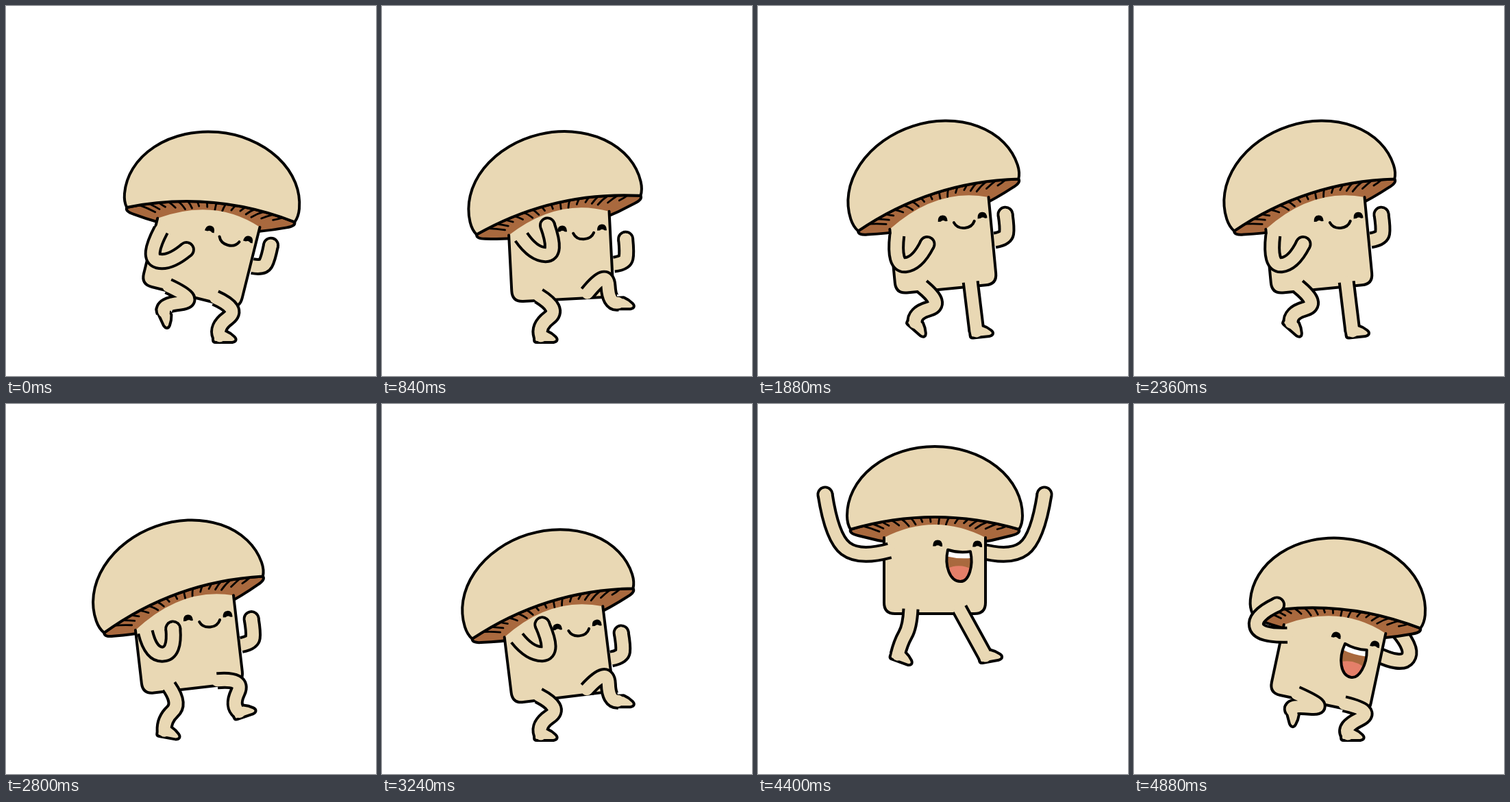
Animation, 540 px wide and 540 px high, one loop 4.92 s. Source, as an HTML page with a canvas:

```html
<!DOCTYPE html>
<html lang="en">
<head>
<meta charset="utf-8">
<title>Dancing mushroom</title>
<style>
  html, body { margin: 0; width: 100%; height: 100%; overflow: hidden; background: #fff; }
  canvas { display: block; width: 100vmin; height: 100vmin; }
</style>
</head>
<body>
<canvas width="540" height="540"></canvas>
<script>
const ctx = document.querySelector('canvas').getContext('2d');
const LOOP = 4920, STEP = 40, BEAT = 480;
const INK = '#000', SKIN = '#e9d8b4', GILL = '#a9693e', TONGUE = '#e57f69';
const LEFT_FOOT = 232, RIGHT_FOOT = 312, GROUND = 482, LEG_LENGTH = 70;
const { sin, cos, PI } = Math;
const clamp = v => Math.min(1, Math.max(0, v));
const rad = deg => deg * PI / 180;
const mix = (a, b, k) => a.map((v, i) => v + (b[i] - v) * k);
const mirror = points => points.map((v, i) => i % 2 ? v : -v);

// Arms in body space: shoulder, two bends, hand
const ARM_LOW = [-65, -84, -76, -39, -41, -39, -22, -65];
const ARM_HIGH = [-56, -94, -40, -68, -4, -65, -17, -109];
const ARM_HANGING = [77, -65, 93, -66, 97, -81, 96, -101];
const ARM_UP = [-66, -92, -110, -80, -150, -110, -160, -174];
const ARM_BEHIND = [-66, -88, -107, -78, -119, -106, -90, -128];

const leftArm = lift => mix(ARM_LOW, ARM_HIGH, lift);
const rightArm = drop => ARM_HANGING.map((v, i) => i % 2 ? v + 18 * drop : v);

// Ankle x, y and foot angle: on the ground, then one swing per beat
function step(x, time) {
  const w = clamp((time % BEAT - 140) / 310) ** 1.3;
  const arc = sin(PI * w), wave = sin(2 * PI * w);
  return [x + 22 * arc - 16 * wave, GROUND - 54 * arc, 36 * arc + 42 * wave];
}

// Torso: hip x, hip y, body angle, cap angle
function dance(t) {
  const a = 2 * PI * t / BEAT;
  const lean = 18 * clamp(1 - t / 1600) ** 2 + 16 * clamp((t - 3300) / 380);
  const bob = ((1 - cos(2 * a)) / 2) ** 2;
  return {
    torso: [
      267 + 2 * cos(a) + 3 * sin(a) - 9 * sin(2 * a),
      426 - 2 * cos(2 * a) + 14 * sin(2 * a),
      lean - 4 + 3 * sin(a),
      lean - 5.4 - 7.6 * cos(a) + 12 * sin(a)
    ],
    leftArm: leftArm(bob),
    rightArm: rightArm(bob),
    leftFoot: step(LEFT_FOOT, t + BEAT / 2),
    rightFoot: step(RIGHT_FOOT, t)
  };
}

const CROUCH = {
  torso: [262, 440, 12, 19],
  leftArm: leftArm(0.75), rightArm: rightArm(0),
  leftFoot: step(LEFT_FOOT, 0), rightFoot: step(RIGHT_FOOT, 0)
};
const JUMP = {
  torso: [258, 404, 0, 0],
  leftArm: ARM_UP, rightArm: mirror(ARM_UP),
  leftFoot: [204, 464, 20], rightFoot: [332, 466, -10]
};
const LAND = {
  torso: [270, 437, 12, 5],
  leftArm: ARM_BEHIND, rightArm: mirror(ARM_BEHIND),
  leftFoot: [231, 447, 75], rightFoot: step(RIGHT_FOOT, 0)
};

function blend(from, to, k) {
  const pose = {};
  for (const part in from) pose[part] = mix(from[part], to[part], k);
  return pose;
}

function poseAt(t) {
  if (t < 3880) return blend(dance(t), CROUCH, clamp((t - 3800) / 80));
  if (t < 3960) return blend(CROUCH, JUMP, (t - 3880) / 80);
  return blend(JUMP, LAND, clamp((t - 4780) / 100));
}

function within(x, y, angle, draw) {
  ctx.save();
  ctx.translate(x, y);
  ctx.rotate(rad(angle));
  draw();
  ctx.restore();
}

function shape(path, fill, line) {
  const p = new Path2D(path);
  if (fill) { ctx.fillStyle = fill; ctx.fill(p); }
  if (line) { ctx.lineWidth = line; ctx.strokeStyle = INK; ctx.stroke(p); }
}

// Tube that is open at the near end; drawEnd adds the hand or foot
function limb([ax, ay, bx, by, cx, cy, dx, dy], drawEnd) {
  const bend = new Path2D(
    `M${ax} ${ay}Q${bx} ${by} ${(bx + cx) / 2} ${(by + cy) / 2}Q${cx} ${cy} ${dx} ${dy}`);
  for (const [color, width, cap] of [[INK, 25, 'butt'], [SKIN, 17, 'round']]) {
    ctx.strokeStyle = color;
    ctx.lineWidth = width;
    ctx.lineCap = cap;
    ctx.stroke(bend);
    within(dx, dy, 0, () => drawEnd(color, width));
  }
}

function arm(points) {
  limb(points, (color, width) => {
    ctx.fillStyle = color;
    ctx.beginPath();
    ctx.arc(0, 0, width / 2, 0, 7);
    ctx.fill();
  });
}

// The knee bends forward as far as the leg is shortened
function leg([x, y, bodyAngle], side, [footX, footY, footAngle]) {
  const c = cos(rad(bodyAngle)), s = sin(rad(bodyAngle));
  const hipX = x + side * c + 7 * s, hipY = y + side * s - 7 * c;
  const dx = footX - hipX, dy = footY - hipY, reach = Math.hypot(dx, dy);
  const bend = Math.sqrt(Math.max(0, LEG_LENGTH ** 2 - reach ** 2)) / 2 / reach;
  const joint = (along, out) =>
    [hipX + dx * along + dy * bend * out, hipY + dy * along - dx * bend * out];
  limb([hipX, hipY, ...joint(0.36, 1.65), ...joint(0.75, -0.2), footX, footY], color =>
    within(0, 0, footAngle, () =>
      shape('M-8-5V5Q-8 7-6 7H18Q24 6 20 2Q15-3 8-6Z', color, color === INK && 8)));
}

function cap() {
  shape('M-123 0Q0-36 123 0Q125 6 112 9Q0 40-112 9Q-125 6-123 0Z', GILL, 4);
  ctx.lineCap = 'round';
  for (let x = -105; x <= 105; x += 14) {
    const y = -18 * (1 - (x / 123) ** 2), k = 0.18 + 0.05 * sin(x);
    shape(`M${x} ${y}Q${x * (1 - k / 2)} ${y + 3} ${x * (1 - k)} ${y + (30 - y) * k}`, null, 2.8);
  }
  shape('M-123 0Q-128-8-128-20A128 101 0 0 1 128-20Q128-8 123 0Q0-36-123 0Z', SKIN, 4);
}

function trunk(tilt) {
  const slope = 74 * Math.tan(rad(tilt)), left = -111 - slope, right = -111 + slope;
  const sides = `M-74 ${left}V-16Q-74 0-58 0H58Q74 0 74-16V${right}`;
  shape(`${sides}Q0-149-74 ${left}Z`, SKIN);
  shape(sides, null, 4);
}

function face(laughing) {
  for (const x of [-31, 27])
    within(x, -11, 0, () => shape('M-7 4Q-7-5 0-5Q7-5 7 4Q4 5 2 3Q-1 2-3 4Z', INK));
  if (!laughing) return shape('M-15-4Q-11 5 0 5Q11 5 15-4', null, 4);
  const mouth = 'M-16-2Q0 3 17 0C22 20 16 44 3 44C-12 44-21 22-16-2Z';
  ctx.save();
  ctx.clip(new Path2D(mouth));
  shape(mouth, GILL);
  shape('M-20-5H22V9Q0 12-20 7Z', '#fff');
  shape('M-20 27Q4 14 26 30V50H-20Z', TONGUE);
  ctx.restore();
  shape(mouth, null, 4);
}

function render(t) {
  const pose = poseAt(t);
  const [x, y, bodyAngle, capAngle] = pose.torso;
  const tilt = capAngle - bodyAngle;
  const lift = 98 * Math.max(0, 1 - ((t - 4390) / 470) ** 2);
  ctx.fillStyle = '#fff';
  ctx.fillRect(0, 0, 540, 540);
  ctx.lineJoin = 'round';
  within(0, -lift, 0, () => {
    within(x, y, bodyAngle, () => {
      arm(pose.rightArm);
      within(0, -123, tilt, cap);
      trunk(tilt);
      within(35, -91, 1, () => face(t >= 3960));
    });
    leg(pose.torso, -35, pose.leftFoot);
    leg(pose.torso, 36, pose.rightFoot);
    within(x, y, bodyAngle, () => arm(pose.leftArm));
  });
}

function tick() {
  const t = Math.floor(performance.now() % LOOP / STEP) * STEP;
  render(t < 80 ? 0 : t);
  requestAnimationFrame(tick);
}
tick();
</script>
</body>
</html>
```
